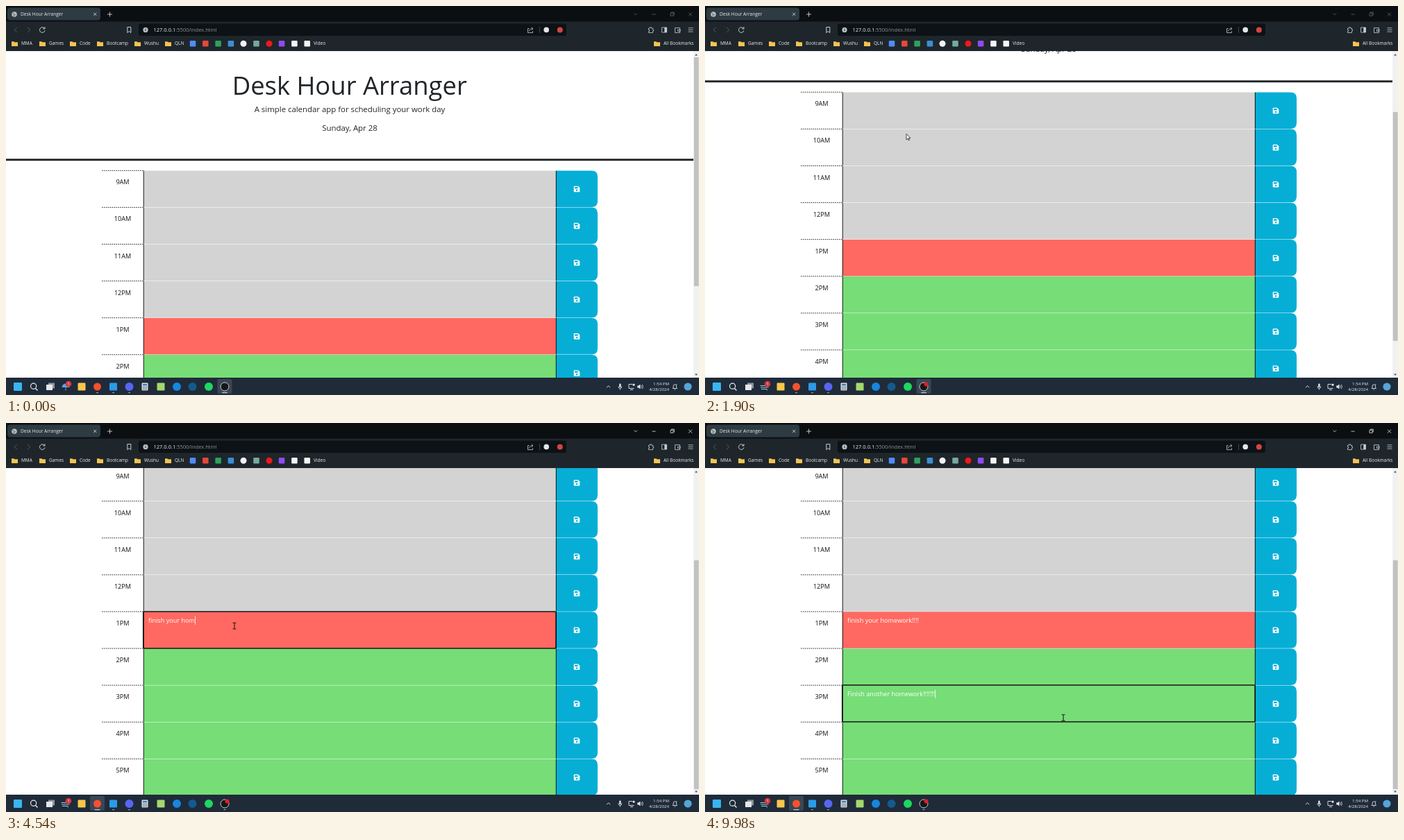
An HTML page that plays this animation: 998x561 px, repeating every 10 s.

```html
<!DOCTYPE html>
<html lang="en">
<head>
<meta charset="utf-8">
<title>Desk Hour Arranger</title>
<style>
  html, body { margin: 0; width: 100%; height: 100%; overflow: hidden; background: #fff; }
  svg { display: block; width: 998px; height: 561px; }
  text { font-family: "Open Sans", "Noto Sans", sans-serif; white-space: pre; }
</style>
</head>
<body>
<svg id="stage" viewBox="0 0 998 561"></svg>
<script>
const LOOP = 10000, TITLE = 'Desk Hour Arranger';
const ROW_TOP = 237, ROW_H = 53.1, MAX_SCROLL = 177.7;
const HOURS = ['9AM', '10AM', '11AM', '12PM', '1PM', '2PM', '3PM', '4PM', '5PM'];

// Drawing helpers
const rect = (x, y, w, h, fill, more = '') =>
  `<rect x="${x}" y="${y}" width="${w}" height="${h}" fill="${fill}" ${more}/>`;
const disc = (x, y, r, fill, more = '') =>
  `<circle cx="${x}" cy="${y}" r="${r}" fill="${fill}" ${more}/>`;
const line = (d, stroke, width = .8, more = '') =>
  `<path d="${d}" fill="none" stroke="${stroke}" stroke-width="${width}" ${more}/>`;
const shape = (d, fill, more = '') => `<path d="${d}" fill="${fill}" ${more}/>`;
const text = (x, y, size, string, fill, more = '') =>
  `<text x="${x}" y="${y}" font-size="${size}" fill="${fill}" ${more}>${string}</text>`;
const at = (x, y, body, more = '') => `<g transform="translate(${x} ${y})" ${more}>${body}</g>`;
const square = (x, y, size, fill) =>
  rect(x - size / 2, y - size / 2, size, size, fill, 'rx="1.2"');
const middle = 'text-anchor="middle"';

function hourRow(label, i) {
  const y = ROW_TOP + i * ROW_H;
  const fill = i < 4 ? '#d3d3d3' : i === 4 ? '#ff6961' : '#77dd77';
  const button = 'M792 .5h51.5q8.5 0 8.5 8.5v35.6q0 8.5-8.5 8.5H792z';
  const floppy = shape('M-4.3-3.4q0-.9.9-.9h5.3l2.4 2.4v5.3q0 .9-.9.9h-6.8q-.9 0-.9-.9z', '#fff')
    + rect(-3, -3, 4.6, 2.3, '#06aed5') + disc(0, 1.8, 1.25, '#06aed5');
  return at(0, y,
    line('M138 .3H198', '#000', .8, 'stroke-dasharray="1.7 1.2"')
    + text(168, 20.4, 9.14, label, '#111', middle)
    + rect(198, .5, 594, ROW_H - .5, fill)
    + (i === 4 ? shape(button, 'none', 'id="glow" stroke="#86b7fe" stroke-width="3.5"') : '')
    + shape(button, '#06aed5')
    + line(`M198.2 .6V${ROW_H}M792.3 .6V${ROW_H}`, '#000', .9)
    + at(822, 27, floppy));
}

function pageView() {
  return `<clipPath id="view"><path d="M0 65H998V536H0z"/></clipPath>`
    + rect(0, 65, 998, 471, '#fff')
    + `<g clip-path="url(#view)"><g id="page">`
    + text(494.7, 128.3, 36.4, TITLE, '#212529', middle)
    + text(495, 153, 11.4, 'A simple calendar app for scheduling your work day', '#212529', middle)
    + text(495, 179.5, 11.4, 'Sunday, Apr 28', '#212529', middle)
    + rect(0, 220.3, 990, 2.9, '#212529')
    + HOURS.map(hourRow).join('')
    + `<rect id="ring" x="197.7" width="594.4" height="53" rx="1.5" fill="none" stroke="#101010" stroke-width="1.5"/>`
    + [4, 6].map(i => text(205, ROW_TOP + i * ROW_H + 16.4, 9.13, '', '#fff', `id="note${i}"`)).join('')
    + `<rect id="caret" width=".8" height="12" fill="#fff"/></g></g>`
    + rect(990, 65, 8, 471, '#f1f1f1')
    + `<rect id="thumb" x="990.8" width="6.8" height="330" fill="#c1c1c1"/>`
    + shape('M992 71.5l2-2.6 2 2.6zM992 530.5l2 2.6 2-2.6z', '#505050');
}

function browserBar() {
  const pale = '#c9cdd0', grey = '#8d9397';
  const folder = (x, label, labelX) =>
    shape(`M${x} 51.2h3.4l1 1.1h4.6v5.6h-9z`, '#f5c451') + text(labelX, 56.4, 6.5, label, '#e8eaec');
  const folders = [[8, 'MMA', 22], [48, 'Games', 62], [92, 'Code', 106], [131, 'Bootcamp', 145],
    [185, 'Wushu', 199], [229, 'QLN', 243], [933, 'All Bookmarks', 947]];
  const marks = ['#4f8df5', '#e5483a', '#2ca35a', '#3b8fd6', '', '#74aa9c', '', '#8f4bf0', '#f4f4f4', '#f4f4f4'];
  return rect(0, 0, 998, 23, '#0b0f12') + rect(0, 22.5, 998, 42.5, '#1f262b')
    + rect(2, 2.5, 134, 18, '#2e3b42', 'rx="4"')
    + disc(12, 12, 3.8, '#b9bec2') + line('M9.5 10.2l2 1 .6 2 1.6-.8M11 15l.3-1.6', '#4a555b', .9)
    + text(21, 14.2, 6.6, TITLE, '#e8eaec')
    + line('M126.2 9.8l4 4m0-4l-4 4M146 12h7m-3.5-3.5v7', '#e4e6e8')
    + `<g id="controls" fill="none" stroke-width=".8"><path d="M904.5 10.5l2.3 2.3 2.3-2.3M930.5 12h5M957 10.2h4v4h-4zM958.3 10v-1h4v4h-1M983 9.5l5 5m0-5l-5 5"/></g>`
    + line('M16 31l-4 3.5 4 3.5M31 31l4 3.5-4 3.5', '#596167')
    + line('M55.3 32.2a3.8 3.8 0 1 0 .7 3.2M56 30.2v2.7h-2.7M174.8 30.5h5v8l-2.5-2-2.5 2z', pale, 1)
    + rect(191, 25.5, 616, 17.5, '#0c1216', 'rx="3"')
    + disc(201, 34.4, 3.6, '#b9bec2') + line('M201 33.8v2.4m0-4v.9', '#0c1216', .9)
    + text(212.5, 37, 7.5, `127.0.0.1<tspan fill="${grey}">:5500/index.html</tspan>`, '#f0f2f3')
    + line('M753.5 32.5h-2v6h7v-2.3M753.5 36.5q.4-3.8 5-3.8M756.8 30.7l2.2 2-2.2 2', pale)
    + line('M768.5 30v9', '#555c61', .7)
    + disc(778.2, 34.4, 3.8, '#e4e6e8') + disc(797.8, 34.6, 4, '#d6443f')
    + line('M925.5 32h2v-1.2h2V32h2v2h1v2h-1v2.5h-6v-2h1v-2h-1zM944.5 31h7v7h-7zM963.5 31.5h7v7h-7zM967.5 34h3.5v2.4h-3.5zM982.5 31.7h7m-7 2.7h7m-7 2.7h7', pale)
    + rect(948.3, 31, 3.2, 7, pale)
    + folders.map(f => folder(...f)).join('')
    + marks.map((c, i) => c ? square(269 + i * 18.3, 54.3, 8.5, c) : '').join('')
    + disc(342, 54.3, 4.5, '#f0f2f3') + disc(379, 54.3, 4.5, '#f01818')
    + text(443, 56.4, 6.5, 'Video', '#e8eaec');
}

function taskBar() {
  const white = '#e9ecef';
  const page = x => rect(x - 4.5, 543.5, 9, 11, '#d9dee2', 'rx="1"');
  return rect(0, 536, 998, 25, '#1f2b39')
    + `<rect id="active" y="538" width="21" height="21" rx="2" fill="#3a4654"/>`
    + square(17, 549, 12, '#38b5f1')
    + line('M42.2 551.2l3.3 3.3', white, 1.4) + disc(39.6, 548.2, 4.1, 'none', `stroke="${white}" stroke-width="1.2"`)
    + rect(61, 543.5, 9, 8, '#8d959c') + rect(58, 546, 9, 8, '#e4e7ea')
    + shape('M80.5 550a5.5 5.5 0 0 1 11 0zM85.6 550h.9v4.5h-1.5v-.8h.6z', '#55a7dd', 'id="umbrella"')
    + line('M79.5 547.5h8q2.5 0 1.8-2M80 550h11.5M81 552.5h6.5q2.2 0 1.6 1.9', '#9fc9e2', 1.1, 'id="wind"')
    + disc(90, 545, 4.3, '#d9363e') + text(90, 547.2, 6, '1', '#fff', middle)
    + square(109, 549, 11, '#f7c64b')
    + disc(131.5, 549, 5.5, '#f4512c') + square(154.5, 549, 11, '#2b9be8') + disc(177.5, 549, 6, '#5865f2')
    + page(200) + rect(197, 545, 6, 2.4, '#3a7dbb')
    + [0, 1, 2].map(r => [0, 1, 2].map(c => rect(197 + c * 2.3, 548.6 + r * 1.9, 1.4, 1.1, '#59626b')).join('')).join('')
    + square(223, 549, 11, '#a5d86c')
    + disc(246, 549, 6, '#1686e0') + disc(268.5, 549, 6, '#155a8d') + disc(292, 549, 6, '#1ed760')
    + disc(315, 549, 6, '#15181b', 'stroke="#d8dadc" stroke-width=".9"')
    + disc(318.5, 545.5, 3, '#e51d24', 'id="recording"')
    + [154.5, 177.5].map(x => rect(x - 1.6, 557, 3.2, 1.2, '#949ca4', 'rx=".6"')).join('')
    + `<rect id="braceA" y="557" height="1.2" rx=".6"/><rect id="braceB" y="557" height="1.2" rx=".6"/>`
    + line('M865 550.3l2.6-2.6 2.6 2.6M882 548.5q0 3 2.4 3t2.4-3M884.4 551.5v2M904.5 551.5h-7.5v-6h5M899 553.5h4', white, .9)
    + rect(883.2, 544.5, 2.4, 5.5, white, 'rx="1.2"') + square(904, 546.3, 3, white)
    + shape('M909.3 547.5h1.8l2.3-2v7l-2.3-2h-1.8z', white)
    + line('M914.8 547q1.2 2 0 4M916.4 545.8q2 3.2 0 6.4', white, .7)
    + text(955, 547.2, 6.15, '1:54 PM', white, 'text-anchor="end"')
    + text(955, 555.2, 6.1, '4/28/2024', white, 'text-anchor="end"')
    + line('M960 551.5h6.5l-1-1.4V548a2.2 2.2 0 0 0-4.4 0v2.1zM962.4 553h1.8', white)
    + text(964.8, 547, 4, 'z', white)
    + disc(982, 549, 5.6, '#55a5d8');
}

const cursors =
  `<path id="arrow" d="M0 0v8.3l1.9-1.8 1.3 2.9 1.3-.6-1.3-2.8h2.6z" fill="#fff" stroke="#000" stroke-width=".7"/>`
  + line('M-2.4-4.4h1.7q.7 0 .7.7v7.4q0 .7-.7.7h-1.7M2.4-4.4H.7Q0-4.4 0-3.7M0 3.7q0 .7.7.7h1.7', '#111', 1, 'id="beam"')
  + `<path id="hand" d="M-.8 0q.8-1 1.6 0v3.6l3.6.9q.9.3.8 1.3l-.6 3.8H0l-2.9-4q.4-1 1.3-.3l.8.6z" fill="#fff" stroke="#000" stroke-width=".6"/>`;

const stage = document.getElementById('stage');
stage.innerHTML = pageView() + browserBar() + taskBar() + at(0, 0, cursors, 'id="pointer"');

const el = id => document.getElementById(id);
const set = (id, attrs) => { for (const k in attrs) el(id).setAttribute(k, attrs[k]); };
const show = (id, on) => set(id, { visibility: on ? 'visible' : 'hidden' });
const clamp = v => Math.max(0, Math.min(1, v));

// Bursts of typing: start, end, characters before, characters after
const notes = {
  4: { focus: 2620, blur: 7040, words: 'finish your homework!!!!',
    bursts: [[3440, 4400, 0, 14], [4460, 4800, 14, 16], [5680, 5960, 16, 21], [6160, 6300, 21, 24]] },
  6: { focus: 7560, blur: LOOP, words: 'Finish another homework!!!!!!!',
    bursts: [[8240, 9200, 0, 20], [9260, 9700, 20, 30]] }
};

function typed(note, t) {
  let count = 0, lastKey = note.focus;
  for (const [start, end, from, to] of note.bursts) {
    if (t < start) break;
    const gap = (end - start) / (to - from - 1);
    const keys = Math.min(to - from - 1, Math.floor((t - start) / gap + 1e-6));
    count = from + keys + 1;
    lastKey = start + keys * gap;
  }
  return { count, lastKey };
}

// Pointer stops: time, x, y
const stops = [[1200, 880, 328], [1400, 165, 152], [1540, 290, 184.5], [2250, 290, 184.5], [2520, 329, 292.6],
  [6620, 329, 292.6], [6900, 822, 298], [7120, 822, 298], [7480, 287, 415], [7740, 287, 415],
  [7900, 512, 371], [9700, 512, 371], [9980, 516, 425]];

function pointerAt(t) {
  const next = stops.findIndex(s => s[0] > t);
  if (next < 0) return stops[stops.length - 1].slice(1);
  if (next === 0) return stops[0].slice(1);
  const [t0, x0, y0] = stops[next - 1], [t1, x1, y1] = stops[next];
  const u = (t - t0) / (t1 - t0), e = u * u * (3 - 2 * u);
  return [x0 + (x1 - x0) * e, y0 + (y1 - y0) * e];
}

function scrollAt(t) {
  if (t < 1900) return Math.max(0, (t - 1683) * .5184);
  const rest = 1 - clamp((t - 1900) / 250);
  return MAX_SCROLL - 65.2 * rest * rest;
}

function draw(t) {
  const scroll = scrollAt(t);
  set('page', { transform: `translate(0 ${-scroll})` });
  set('thumb', { y: 74 + scroll * .698 });

  let focused = false;
  for (const i in notes) {
    const note = notes[i], { count, lastKey } = typed(note, t), label = el('note' + i);
    label.textContent = note.words.slice(0, count);
    if (t < note.focus || t >= note.blur) continue;
    focused = true;
    const y = ROW_TOP + i * ROW_H;
    set('ring', { y: y + .2 });
    set('caret', { x: 205.1 + (count ? label.getComputedTextLength() : 0), y: y + 7 });
    show('caret', (t - lastKey) % 1000 < 500);
  }
  show('ring', focused);
  if (!focused) show('caret', false);
  set('glow', { opacity: .55 * clamp((t - 7040) / 150) * (1 - clamp((t - 7700) / 150)) });

  const browsing = t >= 2600;
  set('controls', { stroke: browsing ? '#e4e6e8' : '#60676c' });
  set('active', { x: browsing ? 121 : 304.5 });
  const brace = (id, x, on) => set(id, {
    x: x - (on ? 4 : 1.6), width: on ? 8 : 3.2, fill: on ? '#b9c6d2' : '#949ca4' });
  brace('braceA', 131.5, browsing);
  brace('braceB', 315, !browsing);
  show('umbrella', t < 1800);
  show('wind', t >= 1800);
  show('recording', t >= 200);

  const [x, y] = pointerAt(t);
  set('pointer', { transform: `translate(${x} ${y})` });
  show('arrow', t >= 1200 && t <= 2250);
  show('hand', t > 2250 && x > 792);
  show('beam', t > 2250 && x <= 792);
}

function tick() {
  draw(performance.now() % LOOP);
  requestAnimationFrame(tick);
}
tick();
</script>
</body>
</html>
```
